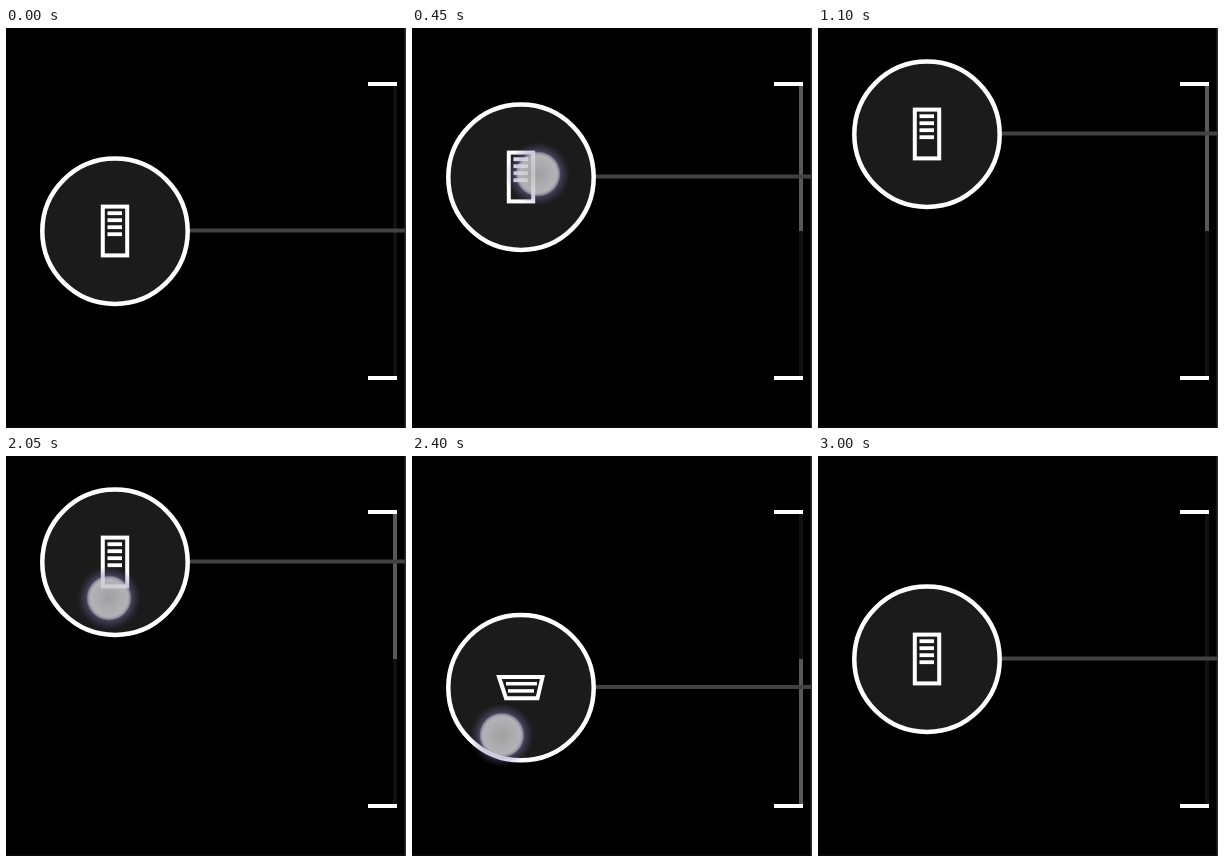
An HTML page with a canvas that plays this animation: 400x400 px, repeating every 3750 ms.

```html
<!DOCTYPE html>
<html lang="en">
<head>
<meta charset="utf-8">
<title>Vertical drag control</title>
<style>
html, body { margin: 0; width: 100%; height: 100%; overflow: hidden; background: #000; }
canvas { display: block; width: 400px; height: 400px; }
</style>
</head>
<body>
<canvas id="stage" width="400" height="400"></canvas>
<script>
const ctx = document.getElementById('stage').getContext('2d');
const LOOP = 3750, STEP = 50, REST = 203, KNOB_X = 109;

// Keys are [time, value]
const knobKeys = [[0, 203], [50, 203], [200, 277], [450, 149], [550, 141], [800, 117],
  [1100, 106], [2050, 106], [2250, 175], [2550, 264], [2700, 236], [2850, 212], [3000, 203]];
const touches = [
  { from: 50, to: 850,
    x: [[50, 112], [200, 110], [450, 126], [850, 131]],
    y: [[50, 208], [200, 290], [450, 146], [550, 138], [850, 118]] },
  { from: 2050, to: 2650,
    x: [[2050, 103], [2250, 92.5], [2550, 88], [2650, 87]],
    y: [[2050, 142], [2250, 243], [2550, 298.5], [2650, 301]] }
];

function slope(keys, i) {
  if (i < 1 || i > keys.length - 2) return 0;
  const rate = j => (keys[j + 1][1] - keys[j][1]) / (keys[j + 1][0] - keys[j][0]);
  const a = rate(i - 1), b = rate(i);
  return a * b > 0 ? 2 * a * b / (a + b) : 0;
}

// Monotone cubic interpolation
function valueAt(keys, t) {
  const i = keys.findIndex(k => k[0] > t) - 1;
  if (i < 0) return keys[keys.length - 1][1];
  const [t0, v0] = keys[i], [t1, v1] = keys[i + 1];
  const d = t1 - t0, u = (t - t0) / d, w = 1 - u;
  return v0 * w * w * (1 + 2 * u) + v1 * u * u * (3 - 2 * u)
    + d * u * w * (slope(keys, i) * w - slope(keys, i + 1) * u);
}

function rect(color, x, y, w, h) {
  ctx.fillStyle = color;
  ctx.fillRect(x, y, w, h);
}

function drawTrack(y) {
  rect('#111', 387, 58, 4, 290);
  if (y !== REST) rect('#585858', 387, y < REST ? 58 : REST, 4, 145);
  rect('#424242', 183, y - 2.5, 216, 4);
  rect('#fff', 362, 54, 29, 4);
  rect('#fff', 362, 348, 29, 4);
}

function drawKnob(y) {
  ctx.save();
  ctx.translate(KNOB_X, y);
  ctx.beginPath();
  ctx.arc(0, 0.2, 72.7, 0, 7);
  ctx.fillStyle = '#1b1b1b';
  ctx.fill();
  ctx.strokeStyle = '#fff';
  ctx.lineWidth = 4.5;
  ctx.stroke();
  ctx.lineWidth = 4;
  if (y > REST) {
    ctx.beginPath();
    ctx.moveTo(-22, -10.5);
    ctx.lineTo(21.5, -10.5);
    ctx.lineTo(16.5, 10.7);
    ctx.lineTo(-15, 10.7);
    ctx.closePath();
    ctx.stroke();
    rect('#fff', -15, -5.5, 31, 3.5);
    rect('#fff', -13, 1.7, 26, 3.5);
  } else {
    ctx.strokeRect(-12.2, -24.4, 24.4, 48.8);
    for (let i = 0; i < 4; i++) rect('#fff', -7.5, -19.7 + i * 7, 14.5, 3.8);
  }
  ctx.restore();
}

function drawTouch(x, y) {
  const glow = ctx.createRadialGradient(x, y, 0, x, y, 32);
  glow.addColorStop(0, 'rgba(182,182,182,.86)');
  glow.addColorStop(0.58, 'rgba(205,203,208,.86)');
  glow.addColorStop(0.66, 'rgba(190,185,210,.72)');
  glow.addColorStop(0.71, 'rgba(130,122,175,.4)');
  glow.addColorStop(1, 'rgba(90,80,140,0)');
  ctx.fillStyle = glow;
  ctx.fillRect(x - 32, y - 32, 64, 64);
}

const start = performance.now();
function frame() {
  const now = Math.max(0, performance.now() - start) % LOOP;
  const t = Math.floor(now / STEP) * STEP;
  const y = valueAt(knobKeys, t);
  rect('#000', 0, 0, 400, 400);
  rect('#2b2b2b', 398.5, 0, 1.5, 400);
  rect('#0c0c0c', 0, 398.5, 398.5, 1.5);
  drawTrack(y);
  drawKnob(y);
  for (const touch of touches) {
    if (t >= touch.from && t < touch.to) drawTouch(valueAt(touch.x, t), valueAt(touch.y, t));
  }
  requestAnimationFrame(frame);
}
frame();
</script>
</body>
</html>
```
